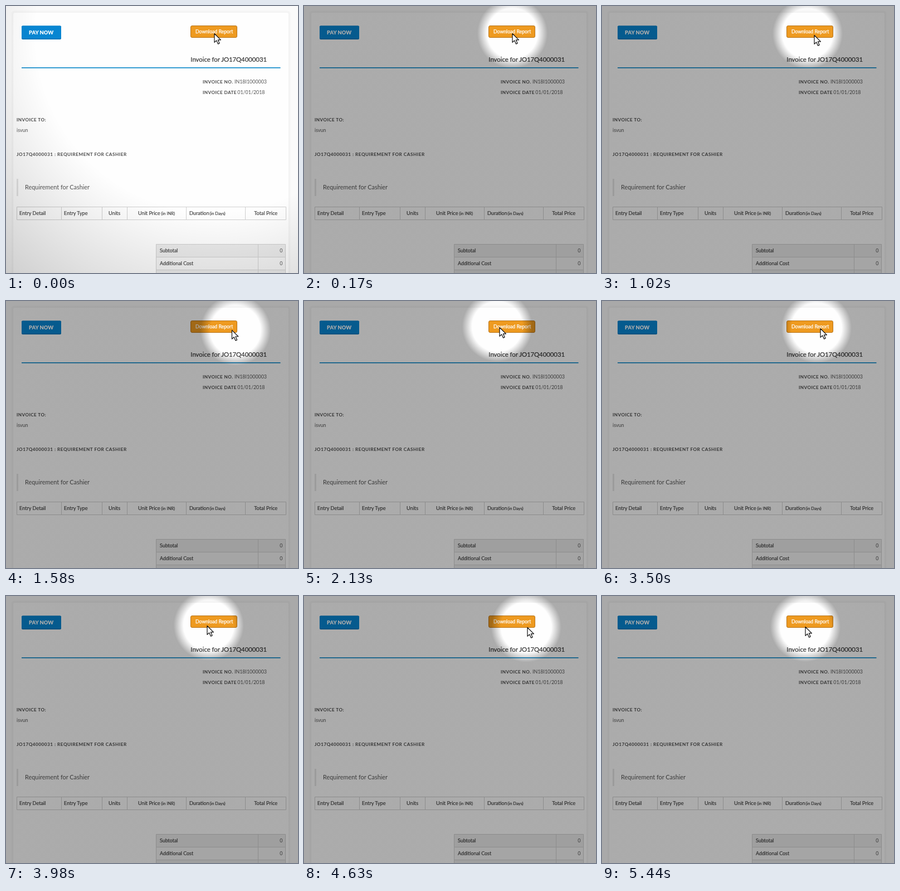
Animation, 524 px wide and 479 px high, one loop 6.43 s. Source, as an HTML page:

```html
<!DOCTYPE html>
<html lang="en">
<head>
<meta charset="utf-8">
<title>Invoice</title>
<style>
  html, body { margin: 0; width: 100%; height: 100%; overflow: hidden; background: #fafafa; }
  svg { display: block; }
  text { font: 8.9px Lato, sans-serif; fill: #555; white-space: pre; }
  .head { font-size: 8.2px; font-weight: 700; letter-spacing: .4px; fill: #4a4a4a; }
  .wide { letter-spacing: .5px; }
  .cell, .sum { fill: #444; stroke: #444; stroke-width: .2px; }
  .cell { font-size: 9.15px; }
  .small { font-size: 7.5px; }
  .title { font-size: 11.3px; fill: #333; stroke: #333; stroke-width: .2px; }
  .quote { font-size: 10.9px; }
  .pay { font-size: 9.4px; font-weight: 900; fill: #fff; }
  .load { font-size: 8.7px; fill: #fff; stroke: #fff; stroke-width: .25px; }
  .end { text-anchor: end; }
  .grid { fill: none; stroke: #d0d0d0; }
</style>
</head>
<body>
<svg width="524" height="479" viewBox="0 0 524 479">
  <defs>
    <radialGradient id="spot" gradientUnits="userSpaceOnUse">
      <stop id="core" stop-opacity="0"/>
      <stop offset="1" stop-opacity=".325"/>
    </radialGradient>
  </defs>
  <rect width="524" height="479" fill="#fafafa"/>
  <rect x="11" y="10" width="498" height="500" rx="4" fill="none" stroke="#f5f5f5" stroke-width="3"/>
  <rect x="12.5" y="11.5" width="495" height="500" rx="3" fill="#fefefe" stroke="#f1f1f1"/>

  <rect x="28" y="35.5" width="71" height="24.5" rx="2" fill="#0472b5"/>
  <rect x="28" y="35.5" width="71" height="23" rx="2" fill="#0886d2"/>
  <rect x="331.5" y="35.5" width="83" height="21" rx="2.5" fill="#ee9a20" stroke="#b8741a"/>
  <rect x="28" y="110" width="464.5" height="1.6" fill="#0886c8"/>
  <rect x="19" y="310" width="3" height="31" fill="#e5e5e5"/>

  <path class="grid" d="M19.5 360.5H502.5V383.5H19.5ZM99.5 360.5v23M172.5 360.5v23M217.5 360.5v23M323.5 360.5v23M429.5 360.5v23"/>
  <path fill="#ebebeb" d="M269 427H502V450H269ZM269 473H502V479H269Z"/>
  <path fill="#f4f4f4" d="M269 450H502V473H269Z"/>
  <path class="grid" d="M269.5 480V427.5H501.5V480M269.5 450.5h232M269.5 473.5h232M452.5 427.5V480"/>

  <g id="labels"></g>
  <rect width="524" height="479" fill="url(#spot)"/>
  <path id="cursor" d="M0 0V15.8L3.7 12.4 6.5 18.6 9.1 17.5 6.5 11.4H11.4Z" fill="#fff" stroke="#111" stroke-width="1.2" stroke-linejoin="round"/>
</svg>
<script>
const $ = id => document.getElementById(id);

const labels = [
  [41, 51, "pay", "PAY NOW"],
  [340, 49, "load", "Download Report"],
  [468, 100, "title end", "Invoice for JO17Q4000031"],
  [353, 139, "head", "INVOICE NO."],
  [468, 139, "end", "IN18I1000003"],
  [353, 157.5, "head", "INVOICE DATE"],
  [464.5, 157.5, "end", "01/01/2018"],
  [19, 207, "head", "INVOICE TO:"],
  [19, 226, "", "isvun"],
  [19, 269, "head wide", "JO17Q4000031 : REQUIREMENT FOR CASHIER"],
  [34, 329, "quote", "Requirement for Cashier"],
  [24, 375, "cell", "Entry Detail"],
  [104, 375, "cell", "Entry Type"],
  [184, 375, "cell", "Units"],
  [237, 375, "cell", "Unit Price"],
  [303, 375, "cell small end", "(in INR)"],
  [329, 375, "cell", "Duration"],
  [393.5, 375, "cell small end", "(in Days)"],
  [487, 375, "cell end", "Total Price"],
  [276, 442, "sum", "Subtotal"],
  [496.5, 442, "end", "0"],
  [276, 465, "sum", "Additional Cost"],
  [496.5, 465, "end", "0"]
];
$("labels").innerHTML = labels.map(([x, y, style, text]) =>
  `<text x="${x}" y="${y}" class="${style}">${text}</text>`).join("");

// Turning points of the pointer: [tick, x, y]
const LOOP = 6430, START = 1020, TICK = 133.7, LAST = 33, LAG = .6;
const path = [
  [-2, 374, 50], [-1, 361, 49], [0, 381, 53], [3, 416, 54], [7, 344, 46],
  [8, 351, 48], [11, 368, 54], [14, 341, 50], [15, 345, 46], [18, 392, 50],
  [22, 361, 54], [27, 401, 57], [32, 365, 56], [LAST, 365, 56]
];

function tickAt(t) {
  if (t < START) return t < 600 ? -2 : -1;
  return Math.min(LAST, Math.floor((t - START) / TICK));
}

function pointer(tick) {
  tick = Math.max(-2, tick);
  const i = Math.max(1, path.findIndex(p => p[0] >= tick));
  const [k0, x0, y0] = path[i - 1], [k1, x1, y1] = path[i];
  const e = (1 - Math.cos(Math.PI * (tick - k0) / (k1 - k0))) / 2;
  return [x0 + (x1 - x0) * e, y0 + (y1 - y0) * e];
}

function draw(now) {
  const t = now % LOOP;
  const tick = tickAt(t);
  const [x, y] = pointer(tick);
  const [px, py] = pointer(tick - 1);
  const [inner, outer] = t < 20 ? [320, 760] : t < 170 ? [170, 360] : [45, 63];

  // The light trails the pointer
  const spot = $("spot");
  spot.setAttribute("cx", x + (px - x) * LAG);
  spot.setAttribute("cy", y + (py - y) * LAG - 1);
  spot.setAttribute("r", outer);
  $("core").setAttribute("offset", inner / outer);
  $("cursor").setAttribute("transform", `translate(${x} ${y - .5})`);
}

const begin = performance.now();
function loop() {
  draw(performance.now() - begin);
  requestAnimationFrame(loop);
}
loop();
</script>
</body>
</html>
```
